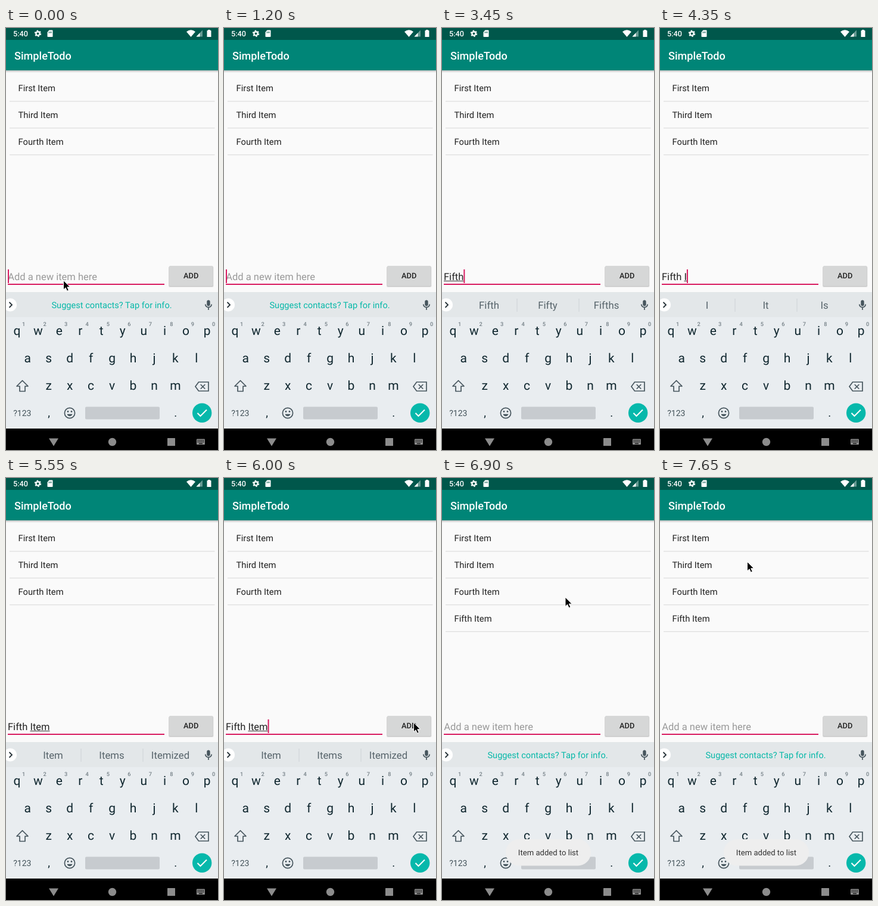
These frames come from a looping animation (356x708 px, 8000 ms). An HTML page:

```html
<!DOCTYPE html>
<html lang="en">
<head>
<meta charset="utf-8">
<title>SimpleTodo</title>
<style>
  html, body { margin: 0; width: 100%; height: 100%; overflow: hidden; background: #fafafa; }
  svg { display: block; width: 100vw; height: 100vh; font-family: Roboto, sans-serif; text-rendering: geometricPrecision; }
  text { white-space: pre; }
  .mid { text-anchor: middle; }
  .line { fill: none; stroke: #46555d; stroke-width: 1.7; }
</style>
</head>
<body>
<svg id="stage" viewBox="0 0 356 708">
  <defs>
    <linearGradient id="fall" x2="0" y2="1">
      <stop stop-color="#000" stop-opacity=".24"/>
      <stop offset="1" stop-color="#000" stop-opacity="0"/>
    </linearGradient>
  </defs>
  <rect width="356" height="708" fill="#fafafa"/>

  <!-- app bar and status bar -->
  <rect y="71" width="356" height="4" fill="url(#fall)"/>
  <rect y="20" width="356" height="51" fill="#008577"/>
  <rect width="356" height="20" fill="#00574b"/>
  <text x="14" y="53" font-size="18.1" font-weight="500" fill="#fff">SimpleTodo</text>
  <g fill="#fff">
    <text x="12" y="14" font-size="12.7" font-weight="500">5:40</text>
    <g transform="translate(53.5 9.3)">
      <circle r="3.1" fill="none" stroke="#fff" stroke-width="2.4"/>
      <circle r="4.8" fill="none" stroke="#fff" stroke-width="1.8" stroke-dasharray="2.5 2.53"/>
    </g>
    <path d="M72.5 3.5h5q1 0 1 1v9.500q0 1-1 1h-7q-1 0-1-1V7z"/>
    <path d="M72 6.500v2M74 6v2.500M76 6v2.500" stroke="#00574b"/>
    <path d="M303 6.200q7.500-6 15 0L310.500 15z"/>
    <path d="M330 3.500V14.500H319.500z" opacity=".4"/>
    <path d="M325.500 8.200V14.500H319.500z"/>
    <path d="M339 3h4v1.200h1.500V15h-7V4.200H339z"/>
  </g>

  <g id="list"></g>

  <!-- entry field and button -->
  <rect x="3" y="429" width="263" height="2" fill="#d81b60"/>
  <text id="hint" x="3.300" y="422.500" font-size="16.5" fill="#999">Add a new item here</text>
  <text id="entry" x="3" y="422.500" font-size="16.5" fill="#212121"></text>
  <rect id="under" y="424" height="1" fill="#333"/>
  <rect id="caret" y="405" width="2" height="23" fill="#d81b60"/>
  <rect x="273" y="400" width="75.500" height="35" rx="2.500" fill="#000" opacity=".09"/>
  <rect x="273.500" y="399.500" width="74.500" height="34.500" rx="2" fill="#000" opacity=".13"/>
  <rect id="button" x="274" y="399" width="73.500" height="34" rx="2"/>
  <text class="mid" x="310.700" y="420" font-size="12.9" font-weight="500" fill="#212121">ADD</text>

  <!-- keyboard -->
  <rect y="443" width="356" height="42" fill="#e3e7e9"/>
  <rect y="485" width="356" height="187" fill="#e9edf0"/>
  <circle cx="7" cy="464.500" r="11" fill="#fff"/>
  <path d="M5.500 460l4.500 4.500-4.500 4.500" fill="none" stroke="#263238" stroke-width="1.800"/>
  <rect x="337.300" y="456.500" width="5.400" height="10" rx="2.700" fill="#46555d"/>
  <path class="line" d="M334.800 463.500a5.200 5.200 0 0 0 10.400 0M340 469v4" stroke-width="1.500"/>
  <text id="promo" class="mid" x="177.500" y="470" font-size="14.6" fill="#06b8a8">Suggest contacts? Tap for info.</text>
  <g id="words" font-size="16.8" fill="#56636a">
    <path d="M126 454v22M230 454v22" stroke="#cdd2d5"/>
  </g>
  <g id="keys" fill="#10272f"></g>
  <path class="line" d="M27.500 591.500l9.500 9.500h-5v8.500h-9V601h-5z" stroke-linejoin="round"/>
  <path class="line" d="M323.500 594h16.500v15h-16.500l-5.500-7.500zM326.800 598l7.500 7.500m0-7.500l-7.500 7.500"/>
  <text class="mid" x="27.300" y="651" font-size="14" fill="#44535a">?123</text>
  <g transform="translate(107 646)">
    <circle class="line" r="8.600"/>
    <path d="M-4.500 1.800h9a4.700 4.700 0 0 1-9 0z" fill="#46555d"/>
    <circle cx="-3" cy="-2.500" r="1.400" fill="#46555d"/>
    <circle cx="3" cy="-2.500" r="1.400" fill="#46555d"/>
  </g>
  <rect x="133" y="635.500" width="125" height="21" rx="2" fill="#c7cbcf"/>
  <circle cx="329.200" cy="645.800" r="16.200" fill="#06b8ab"/>
  <path d="M321.500 646l5 5 10.500-10.500" fill="none" stroke="#fff" stroke-width="2"/>

  <!-- navigation bar -->
  <rect y="672" width="356" height="36"/>
  <g fill="#8c8c8c">
    <path d="M72 688.500h16l-8 13z"/>
    <circle cx="178.500" cy="694.500" r="6.700"/>
    <rect x="271" y="688" width="13" height="13" rx=".5"/>
    <rect x="320" y="689.500" width="14" height="9.500" rx="1"/>
  </g>
  <path d="M321.500 692h11M321.500 694.500h11" stroke="#000" stroke-width="1.300" stroke-dasharray="1.300 1.100"/>
  <path d="M324 697.200h6" stroke="#000" stroke-width="1.200"/>

  <g id="toast">
    <rect x="107" y="606" width="143" height="44.500" rx="22" fill="#eee"/>
    <text class="mid" x="178.500" y="633" font-size="13.1" fill="#333">Item added to list</text>
  </g>
  <path id="pointer" d="M0 0V15.500l3.600-3.300 2.500 5.600 2.700-1.200-2.500-5.400h4.900z" stroke="#fff" stroke-width="1"/>
</svg>
<script>
const LOOP = 8000;
const $ = id => document.getElementById(id);
const NS = 'http://www.w3.org/2000/svg';

function add(parent, tag, attrs, text = '') {
  const el = document.createElementNS(NS, tag);
  for (const k in attrs) el.setAttribute(k, attrs[k]);
  el.textContent = text;
  parent.append(el);
  return el;
}

const set = (id, attrs) => { for (const k in attrs) $(id).setAttribute(k, attrs[k]); };
const show = (id, on) => set(id, { visibility: on ? 'visible' : 'hidden' });

const rows = ['First', 'Third', 'Fourth', 'Fifth'].map((name, i) => {
  const g = add($('list'), 'g', { transform: `translate(0 ${i * 44.9})` });
  add(g, 'text', { x: 20.5, y: 106, 'font-size': 14.75, fill: '#212121' }, name + ' Item');
  add(g, 'rect', { x: 6, y: 122.5, width: 344.5, height: 1, fill: '#d7d7d7' });
  return g;
});

const PITCH = 35.45;
[['qwertyuiop', 18.5], ['asdfghjkl', 36.3], ['zxcvbnm', 71.7]].forEach(([letters, x0], row) => {
  [...letters].forEach((c, i) => {
    const x = x0 + i * PITCH;
    add($('keys'), 'text', { class: 'mid', x, y: 515 + row * 46, 'font-size': 21 }, c);
    if (!row) {
      add($('keys'), 'text', { class: 'mid', x: x + 11.2, y: 500, 'font-size': 9.3, 'font-weight': 500, fill: '#758087' }, (i + 1) % 10);
    }
  });
});
[[',', 72], ['.', 284.7]].forEach(([c, x]) =>
  add($('keys'), 'text', { class: 'mid', x, y: 652, 'font-size': 19 }, c));

const words = [79, 177.5, 276].map(x => add($('words'), 'text', { class: 'mid', x, y: 471 }));

// Step tracks: [start time, value]
const typed = [[0, ''], [2100, 'F'], [3000, 'Fi'], [3150, 'Fif'], [3300, 'Fift'], [3450, 'Fifth'],
  [3750, 'Fifth '], [4200, 'Fifth I'], [4800, 'Fifth Ite'], [4950, 'Fifth Item'], [6150, '']];
const strip = [[0, ''], [3000, 'Fi First Find'], [3150, 'Fif Fifth Fifty'], [3300, 'Fift Fifth Fifty'],
  [3450, 'Fifth Fifty Fifths'], [3750, ''], [4350, 'I It Is'], [4800, 'Item Items Itemized'], [6150, '']];
const blink = [[0, 1], [450, 0], [900, 1], [1500, 0], [1950, 1], [2700, 0], [3000, 1],
  [5550, 0], [6000, 1], [6750, 0], [7200, 1], [7650, 0]];
const toast = [[0, 0], [6300, 0.5], [6450, 0.9], [6600, 1]];
const pointer = [[0, [96.5, 423.5]], [150, null], [900, [132, 419]], [1050, [137, 420]], [1200, null],
  [5850, [322, 420]], [6000, [318.5, 410.5]], [6600, [292, 335]], [6750, [251, 252]], [6900, [207, 200]],
  [7050, [174, 165]], [7200, [157, 149]], [7350, [150, 143]], [7500, [146.5, 140.5]]];

const at = (track, t) => track.findLast(([start]) => start <= t)[1];

const pen = document.createElement('canvas').getContext('2d');
pen.font = '16.5px Roboto, sans-serif';
const width = s => pen.measureText(s).width;

function draw(t) {
  const text = at(typed, t);
  const end = 3 + width(text);
  const from = 3 + width(text.slice(0, text.lastIndexOf(' ') + 1));
  $('entry').textContent = text;
  show('hint', !text);
  set('under', { x: from, width: end - from });
  set('caret', { x: end });
  show('caret', at(blink, t));

  const picks = at(strip, t);
  show('promo', !picks);
  show('words', picks);
  words.forEach((w, i) => w.textContent = picks.split(' ')[i] || '');

  rows[3].setAttribute('visibility', t >= 6150 ? 'visible' : 'hidden');
  set('button', { fill: t >= 6150 && t < 6600 ? '#ced0d0' : '#d6d7d7' });
  set('toast', { opacity: at(toast, t) });

  const tip = at(pointer, t);
  show('pointer', tip);
  if (tip) set('pointer', { transform: `translate(${tip})` });
}

function tick() {
  draw(performance.now() % LOOP);
  requestAnimationFrame(tick);
}
tick();
</script>
</body>
</html>
```
